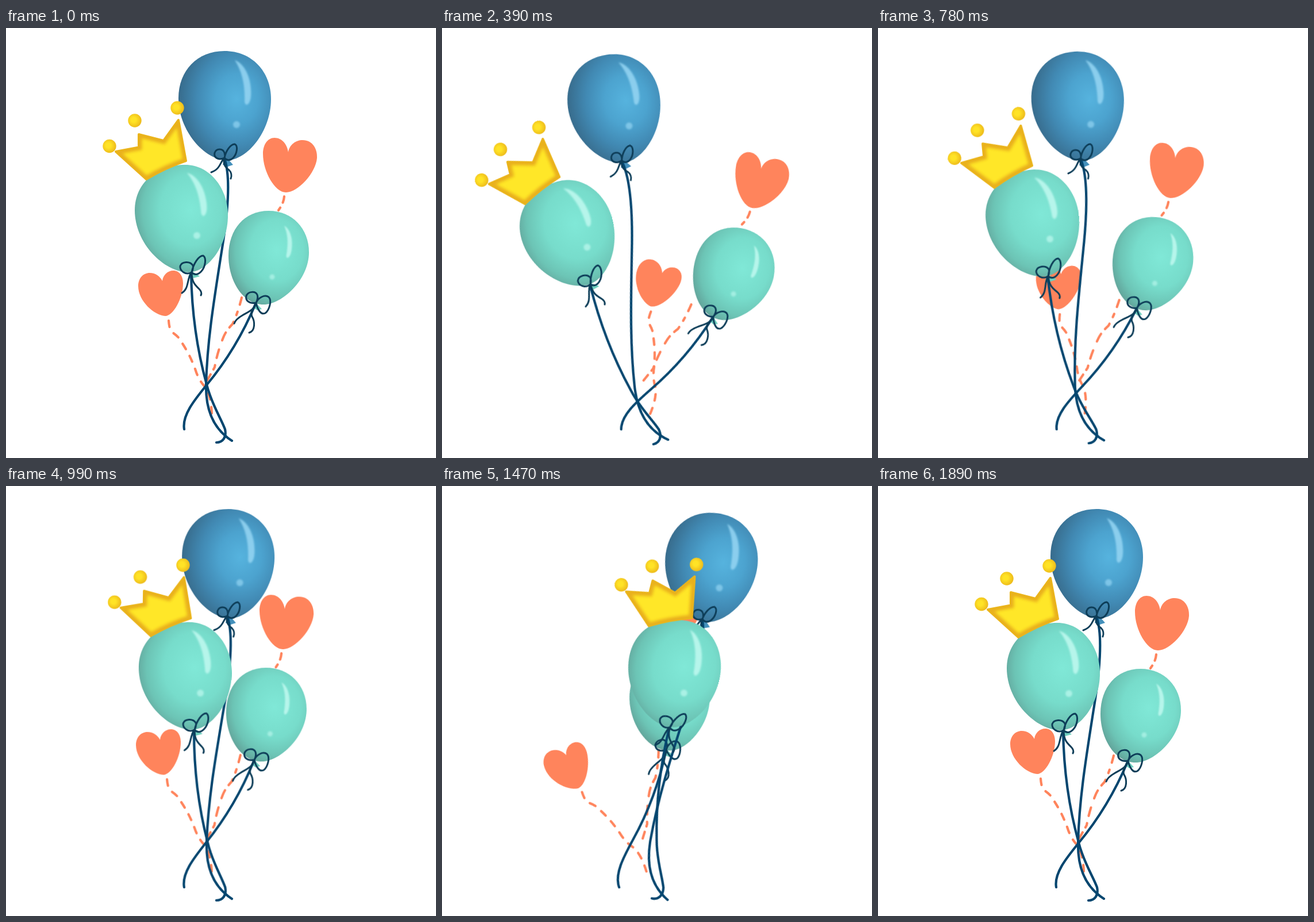
These frames come from a looping animation (748x748 px, 1950 ms). An HTML page:

```html
<!DOCTYPE html>
<html lang="en">
<head>
<meta charset="utf-8">
<title>Balloons</title>
<style>
  html, body { margin: 0; width: 100%; height: 100%; overflow: hidden; background: #fff; }
  svg { display: block; width: 100%; height: 100%; }

  /* --a: angle at the first extreme, --b: angle at the opposite one */
  .sway { animation: sway 1950ms -3ms infinite; }
  @keyframes sway {
    0%      { transform: rotate(0deg); animation-timing-function: steps(7); }
    10.769% { transform: rotate(calc(var(--a) * .475)); animation-timing-function: steps(8); }
    23.076% { transform: rotate(calc(var(--a) * 1.015)); animation-timing-function: steps(4); }
    29.23%  { transform: rotate(calc(var(--a) * .782)); animation-timing-function: steps(14); }
    50.769% { transform: rotate(calc(var(--b) * .066)); animation-timing-function: steps(9); }
    64.615% { transform: rotate(calc(var(--b) * .635)); animation-timing-function: steps(6); }
    73.846% { transform: rotate(var(--b)); animation-timing-function: steps(1); }
    75.384% { transform: rotate(calc(var(--b) * .953)); animation-timing-function: steps(14); }
    96.923%, 100% { transform: rotate(0deg); }
  }
  #heartL { --a: 28.8deg; --b: -14.8deg; transform-origin: 358px 680px; }
  #heartR { --a: 10.8deg; --b: -13deg; transform-origin: 350px 617px; }
  #right  { --a: 11deg; --b: -11.2deg; transform-origin: 310px 708px; }
  #blue   { --a: -9deg; --b: 9deg; transform-origin: 380px 715px; }
  #left   { --a: -15deg; --b: 15deg; transform-origin: 380px 715px; }

  .heart { fill: #ff845c; }
  .line, .bow, .trail { fill: none; stroke-linecap: round; stroke-linejoin: round; }
  .line { stroke: #04466f; stroke-width: 4.2; }
  .bow { stroke: #0d3d58; stroke-width: 3; }
  .trail { stroke: #ff845c; stroke-width: 4.2; }
  .shine { filter: url(#soft); }
</style>
</head>
<body>
<svg viewBox="0 0 748 748">
  <defs>
    <radialGradient id="sky" cx=".63" cy=".44" r=".66">
      <stop offset="0" stop-color="#56b3de"/>
      <stop offset=".35" stop-color="#4ca3cf"/>
      <stop offset=".65" stop-color="#4189b3"/>
      <stop offset="1" stop-color="#366786"/>
    </radialGradient>
    <radialGradient id="mint" cx=".6" cy=".42" r=".66">
      <stop offset="0" stop-color="#80e8d7"/>
      <stop offset=".5" stop-color="#77dccb"/>
      <stop offset=".78" stop-color="#6cc4b5"/>
      <stop offset="1" stop-color="#609f96"/>
    </radialGradient>
    <radialGradient id="gold" cx=".42" cy=".45" r=".6">
      <stop offset=".3" stop-color="#ffe326"/>
      <stop offset="1" stop-color="#ecb81a"/>
    </radialGradient>
    <filter id="soft" x="-50%" y="-50%" width="200%" height="200%"><feGaussianBlur stdDeviation="1.6"/></filter>
    <filter id="rim" x="-20%" y="-20%" width="140%" height="140%"><feGaussianBlur stdDeviation="2.5"/></filter>
    <path id="crown" d="M191 215L231 207.500L231 185L274 196L300 160L313 231Q277 243 244 263Z"/>
    <clipPath id="crownClip"><use href="#crown"/></clipPath>
    <path id="shine" class="shine" d="M0 0C18 6 30 34 28 62C27 78 18 82 17 72C18 44 13 20 0 0Z"/>
  </defs>

  <g id="heartL" class="sway">
    <path class="trail" stroke-dasharray="11 13.400" d="M283 509Q284 526 290 530Q302 538 307 549Q322 572 331 599Q337 615 346 624Q357 640 358 672"/>
    <path class="heart" d="M272 440C273 430 281 422 291 422C302 422 308 432 308 444C308 470 291 501 277 501C258 500 230 475 230 449C230 435 239 426 250 426C260 426 268 432 272 440Z"/>
  </g>

  <g id="heartR" class="sway">
    <path class="trail" stroke-dasharray="11 10 6 30" d="M484 293Q483 305 474 317"/>
    <path class="trail" stroke-dasharray="12 10 8 13 15 17 15 11 12 13 6 13 20" d="M350 613L363 590Q368 562 379 536Q384 525 394 515Q403 497 410 469"/>
    <path class="heart" d="M491 216C493 203 504 195 516 195C533 195 542 210 541 226C539 252 508 286 487 286C468 286 447 250 447 219C447 203 455 191 467 191C480 191 489 202 491 216Z"/>
  </g>

  <g id="right" class="sway">
    <path fill="#6fcfbe" d="M434 477L445 489L437 491L430 486Z"/>
    <path fill="url(#mint)" d="M457 318C498 318 527 349 527 390C527 438 480 481 448 481C412 481 387 440 387 396C387 350 415 318 457 318Z"/>
    <g fill="#bdf8ee" opacity=".9">
      <use href="#shine" transform="translate(484 344) rotate(9) scale(.68 .7)"/>
      <circle class="shine" cx="463" cy="433" r="4.500" opacity=".7"/>
    </g>
    <path class="line" d="M434 480C416 523 388 574 349 621C327 648 306 674 310 698"/>
    <path class="bow" d="M435 478C423 480 416 474 418 466C421 458 434 457 437 464C439 469 437 474 435 478C439 469 450 463 457 468C463 474 458 491 451 496C443 500 437 488 435 478C431 492 420 494 411 500C404 504 399 508 397 514M435 478C430 488 425 497 428 502C433 510 434 527 423 530"/>
  </g>

  <g id="blue" class="sway">
    <path fill="#4490bb" d="M380 225L388 230L395 238L386 241L377 238Z"/>
    <path fill="url(#sky)" d="M380 40C427 40 461 75 461 124C461 178 421 230 384 230C345 230 300 178 300 122C300 74 333 40 380 40Z"/>
    <g fill="#92d3f1" opacity=".9">
      <use href="#shine" transform="translate(398 56)"/>
      <circle class="shine" cx="401" cy="168" r="6" opacity=".8"/>
    </g>
    <path class="line" d="M380 227C390 256 387 310 378 370C364 460 350 540 348 620C347 665 361 698 393 718"/>
    <path class="bow" d="M380 226C369 231 361 225 363 217C366 209 377 209 380 217C381 220 381 223 380 226C382 215 390 202 398 202C404 205 402 219 395 226C390 231 384 231 380 226C373 231 374 245 357 251M380 226C377 236 382 243 388 247C392 251 393 257 391 262"/>
  </g>

  <g id="left" class="sway">
    <path fill="#6fcfbe" d="M322 423L332 428L337 432L326 435L317 432Z"/>
    <path fill="url(#mint)" d="M312 238C353 238 386 277 386 326C386 378 352 424 318 425C275 425 224 375 224 317C224 270 262 238 312 238Z"/>
    <g fill="#bdf8ee" opacity=".9">
      <use href="#shine" transform="translate(315 252) rotate(-6)"/>
      <circle class="shine" cx="332" cy="361" r="6" opacity=".8"/>
    </g>
    <path class="line" d="M322 426C323 490 331 555 349 620C357 653 374 679 381 698C384 712 377 721 366 721"/>
    <path class="bow" d="M323 425C312 431 302 422 303 414C306 406 320 405 325 413C326 417 325 421 323 425C326 410 335 396 343 396C349 400 347 415 340 423C334 430 327 430 323 425C314 436 319 453 306 461M323 425C323 443 330 448 336 454C340 458 341 461 339 465"/>
    <use href="#crown" fill="#ffe728" stroke="#ebb51a" stroke-width="4" stroke-linejoin="round"/>
    <g clip-path="url(#crownClip)">
      <use href="#crown" fill="none" stroke="#e9b11a" stroke-width="11" filter="url(#rim)"/>
    </g>
    <g fill="url(#gold)">
      <circle cx="180" cy="205.500" r="11.700"/>
      <circle cx="224" cy="161" r="11.700"/>
      <circle cx="298" cy="139" r="11.700"/>
    </g>
  </g>
</svg>
</body>
</html>
```
